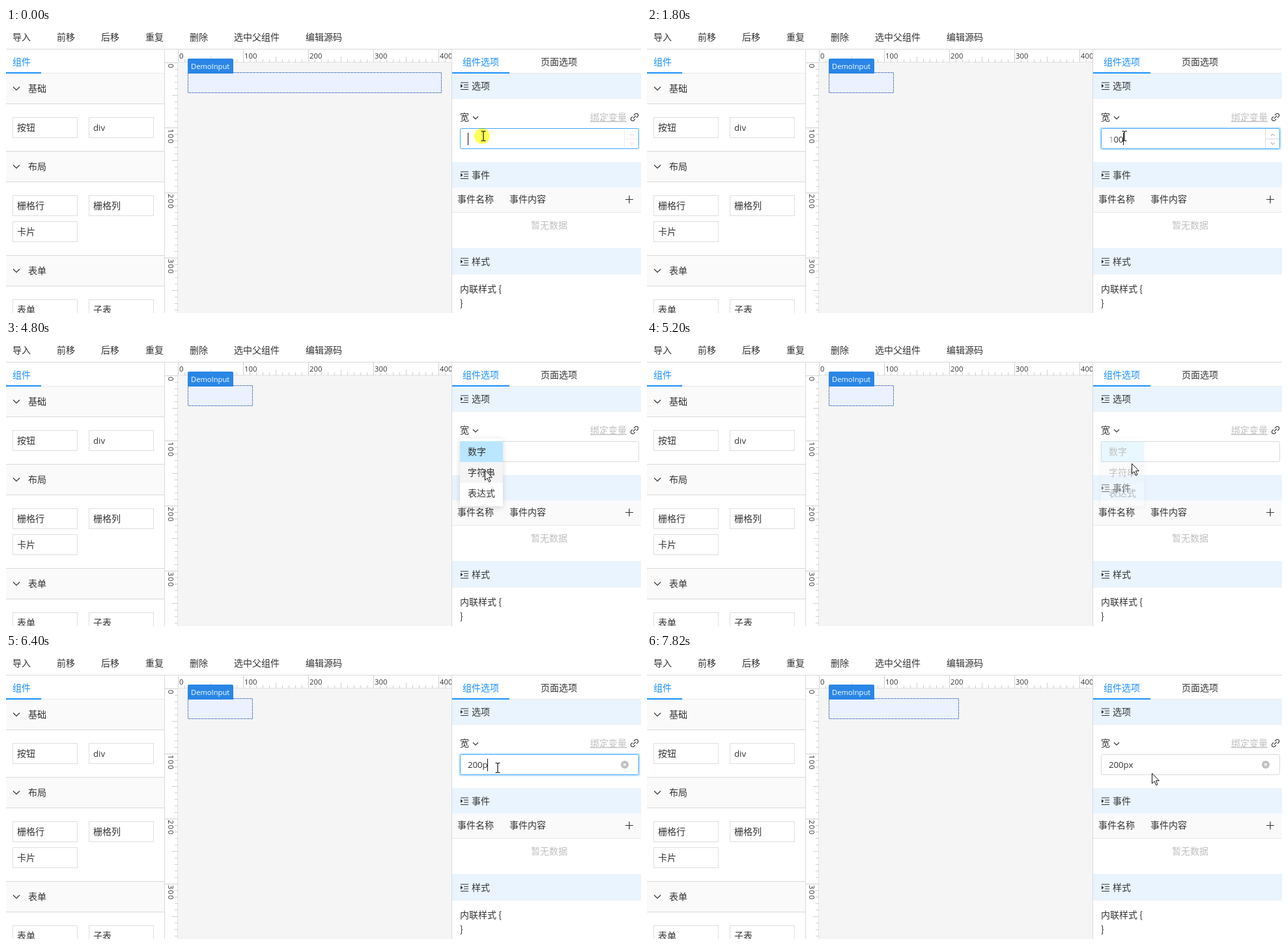
Animation of 975x438 px, one loop 8000 ms. Source, as an HTML page:

```html
<!DOCTYPE html>
<html lang="zh-CN">
<head>
<meta charset="utf-8">
<title>组件编辑器</title>
<style>
  html, body { margin: 0; width: 100%; height: 100%; overflow: hidden; background: #fff; }
  svg { display: block; width: 975px; height: 438px; }
  text { font: 14px "Noto Sans CJK SC", "Noto Sans CJK", sans-serif; fill: #333; white-space: pre; }
  .latin { font: 13.2px "Open Sans", "Noto Sans", sans-serif; }
  .rule { font: 11.3px "Open Sans", "Noto Sans", sans-serif; }
  .tag { font: 500 11.2px "Open Sans", "Noto Sans", sans-serif; fill: #fff; }
  .blue { fill: #1890ff; }
  .mute { fill: #bfbfbf; }
  .link { text-decoration: underline; }
  .icon { fill: none; stroke: #333; stroke-width: 1.2; }
  #halo { fill: #ffff55; mix-blend-mode: multiply; }
  #menu { filter: drop-shadow(0 2px 4px rgba(0, 0, 0, .15)); }
</style>
</head>
<body>
<svg viewBox="0 0 975 438" xmlns="http://www.w3.org/2000/svg">
  <g id="base"></g>

  <rect id="comp" x="279.5" y="68.5" height="31" fill="#ebf1ff" stroke="#8fb4f0"/>
  <rect id="dash" x="279.5" y="68.5" height="31" fill="none" stroke="#6680b5" stroke-dasharray="3 2"/>
  <path d="M279 70V49q0-2 2-2H347q2 0 2 2V70z" fill="#2a86e6"/>
  <text class="tag" x="284" y="63">DemoInput</text>

  <rect id="glow" x="696" y="153" width="277" height="34" rx="3" fill="none" stroke="#1890ff" stroke-opacity=".2" stroke-width="2"/>
  <rect id="field" x="697.5" y="154.5" width="274" height="31" rx="2" fill="#fff"/>
  <g id="spin" fill="none" stroke="#d9d9d9">
    <path d="M949.5 155V185M950 170.5H971"/>
    <path d="M958 166l3-3 3 3M958 176l3 3 3-3" stroke="#999"/>
  </g>
  <g id="clear">
    <circle cx="950" cy="170" r="6" fill="#bfbfbf"/>
    <path d="M948 168l4 4m0-4l-4 4" stroke="#fff" stroke-width="1.2"/>
  </g>
  <text id="value" class="latin" x="709"></text>
  <path id="caret" d="M.5 161V180" stroke="#111"/>

  <g id="menu">
    <rect x="697" y="150" width="66" height="104" rx="2" fill="#fff"/>
    <rect x="697" y="154" width="66" height="32" fill="#bae7ff"/>
    <rect id="hover" x="697" y="186" width="66" height="32" fill="#f5f5f5"/>
    <text x="709" y="175">数字</text>
    <text x="709" y="207">字符串</text>
    <text x="709" y="239">表达式</text>
  </g>

  <circle id="halo" r="12"/>
  <path id="beam" d="M-3.5 -7.5H-1.5L0 -6.5 1.5 -7.5H3.5M0 -6.5V6.5M-3.5 7.5H-1.5L0 6.5 1.5 7.5H3.5" fill="none" stroke="#111" stroke-width="1.2"/>
  <path id="arrow" d="M.5 .5V16L4 12.6 6.6 18.6 9 17.5 6.4 11.7H11.4z" fill="#fff" stroke="#111"/>
</svg>

<script>
const $ = id => document.getElementById(id);
const parts = [];
const add = markup => parts.push(markup);
const box = (x, y, w, h, fill) => add(`<rect x="${x}" y="${y}" width="${w}" height="${h}" fill="${fill}"/>`);
const label = (x, mid, text, cls = "") => add(`<text x="${x}" y="${mid + 5}" class="${cls}">${text}</text>`);
const stroke = (d, color = "#333", width = 1.2) =>
  add(`<path d="${d}" fill="none" stroke="${color}" stroke-width="${width}"/>`);
const chevron = (x, y, r) => stroke(`M${x - r} ${y - r / 2}l${r} ${r} ${r} ${-r}`);

function toolbar() {
  ["导入", "前移", "后移", "重复", "删除", "选中父组件"].forEach((t, i) => label(10 + 68 * i, 14, t));
  label(460, 14, "编辑源码");
  box(0, 32, 975, 1, "#d9d9d9");
}

function library() {
  label(10, 52, "组件", "blue");
  box(0, 69, 243, 1, "#e8e8e8");
  box(0, 68, 54, 2, "#1890ff");
  const groups = [
    [70, "基础", ["按钮", "div"]],
    [190, "布局", ["栅格行", "栅格列", "卡片"]],
    [350, "表单", ["表单", "子表"]]
  ];
  for (const [y, name, items] of groups) {
    box(0, y, 243, 46, "#fafafa");
    if (y > 70) box(0, y - 1, 243, 1, "#d9d9d9");
    box(0, y + 46, 243, 1, "#d9d9d9");
    chevron(16, y + 23, 5);
    label(34, y + 23, name);
    items.forEach((t, i) => {
      const x = 10 + 117 * (i % 2), top = y + 67 + 40 * (i >> 1);
      add(`<rect x="${x + .5}" y="${top + .5}" width="99" height="31" fill="#fff" stroke="#dedede"/>`);
      label(x + 7, top + 16, t, t === "div" ? "latin" : "");
    });
  }
  box(243, 33, 1, 405, "#d9d9d9");
}

function rulers() {
  box(264, 53, 420, 385, "#f5f5f5");
  box(264, 52, 420, 1, "#e2e2e2");
  box(263, 53, 1, 385, "#e2e2e2");
  let d = "";
  for (let n = 0; n < 42; n++) {
    const size = n % 10 === 0 ? 20 : n % 5 === 0 ? 9 : 5, p = n * 10 + .5;
    d += `M${264 + p} 53v${-size}`;
    if (n < 39) d += `M264 ${53 + p}h${-size}`;
  }
  stroke(d, "#cfcfcf", 1);
  for (let n = 0; n <= 4; n++) {
    add(`<text class="rule" x="${266 + 100 * n}" y="47">${n * 100}</text>`);
    if (n < 4) add(`<text class="rule" letter-spacing="1.4" transform="translate(249 ${55 + 100 * n}) rotate(90)">${n * 100}</text>`);
  }
}

function inspector() {
  box(684, 33, 291, 405, "#fff");
  box(684, 33, 1, 405, "#d9d9d9");
  label(701, 52, "组件选项", "blue");
  label(821, 52, "页面选项");
  box(685, 69, 290, 1, "#e8e8e8");
  box(685, 68, 88, 2, "#1890ff");
  for (const [y, mid, end, name] of [[70, 89, 108, "选项"], [206, 226, 245, "事件"], [338, 359, 378, "样式"]]) {
    box(685, y, 290, end - y, "#e9f4ff");
    box(685, end, 290, 1, "#eef0f2");
    stroke(`M698 ${mid - 5}h12M703 ${mid - 1.5}h7M703 ${mid + 2}h7M698 ${mid + 5.5}h12`);
    add(`<path d="M698 ${mid - 3}l3.5 3-3.5 3z" fill="#333"/>`);
    label(715, mid, name);
  }
  label(697, 137, "宽");
  chevron(721, 138, 4);
  label(897, 137, "绑定变量", "mute link");
  add(`<g class="icon" transform="translate(965 137) rotate(-45)">
    <path d="M-1.5 -2.8H-4a2.8 2.8 0 0 0 0 5.6H-1.5M1.5 -2.8H4a2.8 2.8 0 0 1 0 5.6H1.5M-3 0H3"/></g>`);
  box(685, 245, 290, 38, "#fafafa");
  box(685, 283, 290, 1, "#e8e8e8");
  label(693, 263, "事件名称");
  label(773, 263, "事件内容");
  stroke("M951 263.5h12M957 257.5v12");
  label(806, 303, "暂无数据", "mute");
  label(697, 401, "内联样式 {");
  label(697, 423, "}");
}

toolbar();
library();
rulers();
inspector();
$("base").innerHTML = parts.join("");

// Each step changes only the listed properties.
const start = {
  text: "", caret: 1, focus: .4, spin: .4, clear: 0, halo: [731, 166],
  cursor: "beam", at: [733, 166], width: 390, menu: 0, hover: 0
};
const steps = [
  [200, { focus: 1, spin: 1 }],
  [400, { halo: null }],
  [600, { caret: 0 }],
  [1000, { text: "1", caret: 1, width: 1 }],
  [1200, { text: "10", width: 10 }],
  [1400, { text: "100", width: 100 }],
  [1600, { caret: 0 }],
  [1800, { caret: 1 }],
  [4000, { focus: 0, spin: 0, caret: 0, at: [703, 138], halo: [700, 138] }],
  [4200, { halo: null, cursor: "arrow", at: [709, 137] }],
  [4400, { menu: .6, at: [716, 150] }],
  [4600, { menu: 1, at: [727, 176] }],
  [4800, { hover: 1, at: [735, 198] }],
  [5000, { halo: [735, 200] }],
  [5200, { halo: null, menu: .3, text: "", at: [744, 188] }],
  [5400, { menu: 0, cursor: "beam", at: [755, 175], halo: [753, 175], focus: 1, caret: 1 }],
  [5600, { halo: null, text: "2", clear: 1 }],
  [5800, { text: "20" }],
  [6000, { text: "200", caret: 0 }],
  [6200, { caret: 1 }],
  [6400, { text: "200p" }],
  [6800, { text: "200px", width: 200 }],
  [7000, { caret: 0 }],
  [7200, { cursor: "arrow", at: [767, 187] }],
  [7400, { at: [775, 183], halo: [775, 185] }],
  [7600, { focus: .4, halo: null }],
  [7820, { focus: 0 }]
];

const stateAt = t => Object.assign({}, start, ...steps.filter(s => s[0] <= t).map(s => s[1]));
const set = (id, name, v) => $(id).setAttribute(name, v);
const move = (id, [x, y]) => set(id, "transform", `translate(${x} ${y})`);

function draw(s) {
  for (const id of ["comp", "dash"]) set(id, "width", Math.max(s.width - 1, 1));
  set("glow", "opacity", s.focus === 1 ? 1 : 0);
  set("field", "stroke", s.focus ? "#40a9ff" : "#d9d9d9");
  for (const id of ["spin", "clear", "caret", "menu"]) set(id, "opacity", s[id]);
  set("hover", "opacity", s.hover);

  const value = $("value"), number = s.text.startsWith("1");
  value.innerHTML = number ? `<tspan fill="#8f98a8">1</tspan>${s.text.slice(1)}` : s.text;
  set("value", "y", number ? 176 : 175);
  const end = s.text ? value.getComputedTextLength() : 0;
  move("caret", [Math.floor(709 + end), 0]);

  set("halo", "opacity", s.halo ? 1 : 0);
  if (s.halo) move("halo", s.halo);
  for (const id of ["beam", "arrow"]) {
    set(id, "opacity", s.cursor === id ? 1 : 0);
    move(id, s.at);
  }
}

function tick() {
  draw(stateAt(performance.now() % 8000));
  requestAnimationFrame(tick);
}
tick();
</script>
</body>
</html>
```
